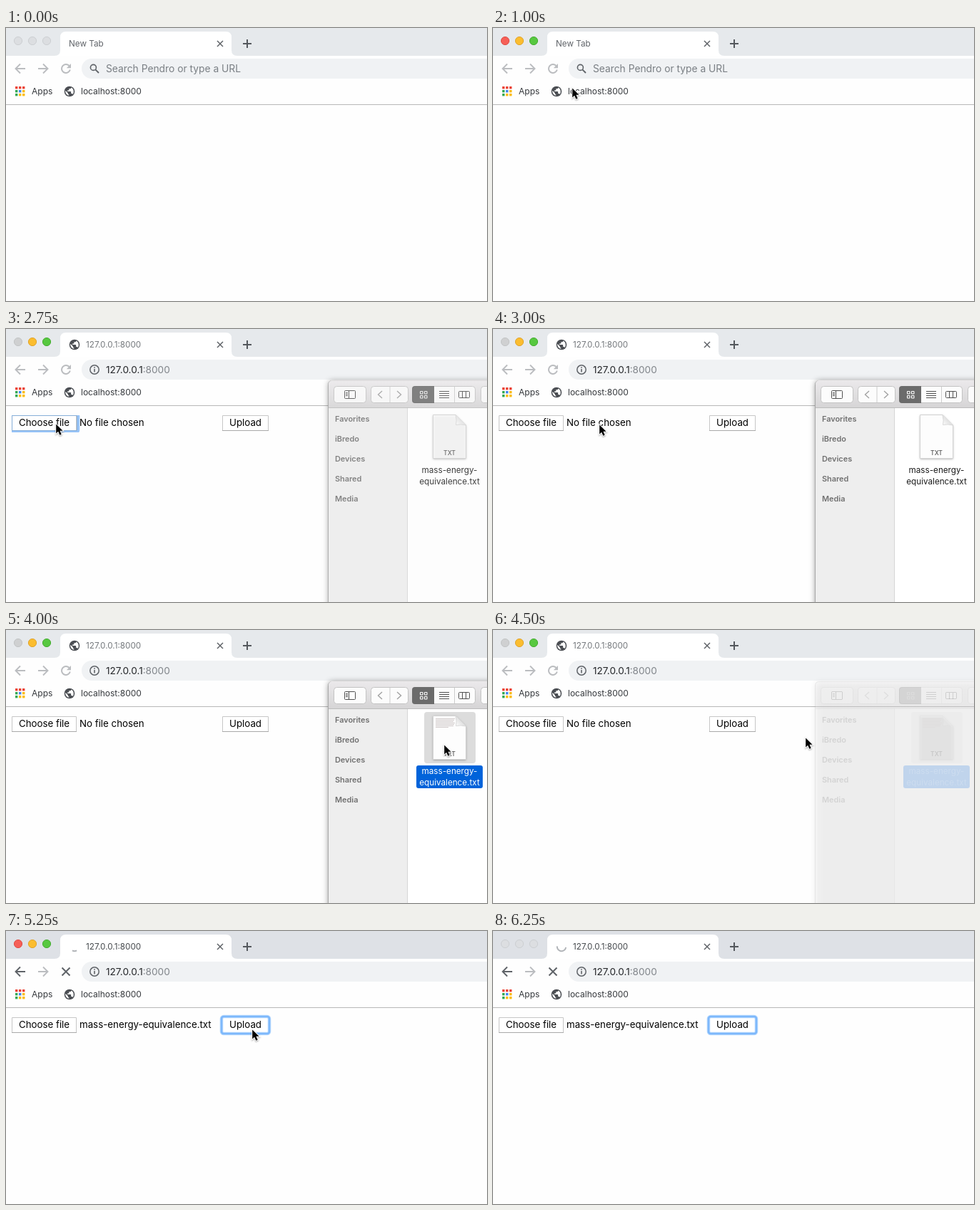
Animation, 674 px wide and 383 px high, one loop 6500 ms. Source, as an HTML page with a canvas:

```html
<!DOCTYPE html>
<html lang="en">
<head>
<meta charset="utf-8">
<title>File upload</title>
<style>
html, body { margin: 0; width: 100%; height: 100%; overflow: hidden; background: #fff; }
canvas { display: block; width: 674px; height: 383px; }
</style>
</head>
<body>
<canvas id="stage" width="674" height="383"></canvas>
<script>
const ctx = document.getElementById('stage').getContext('2d');
const W = 674, H = 383, LOOP = 6500, STEP = 250;
const DARK = '#5f6368', DIM = '#bbbdc0';

// [first step, x, y]; without a place the pointer is hidden
const pointerKeys = [
  [0], [1, 519, 191], [2, 122, 136], [3, 96, 93], [4, 110, 83], [8, 69, 128],
  [9, 69, 132], [12, 148, 133], [13, 539, 165], [14, 568, 173], [15, 613, 160],
  [18, 437, 150], [19, 360, 134], [20, 344, 137], [22]
];
const spinnerArcs = [[60, 120], [80, 150], [80, 230], [130, 270], [8, 185]];

const between = (n, a, b) => n >= a && n < b;

function fill(path, color) {
  ctx.fillStyle = color;
  ctx.fill(new Path2D(path));
}

function line(path, color, width = 1) {
  ctx.strokeStyle = color;
  ctx.lineWidth = width;
  ctx.stroke(new Path2D(path));
}

function rect(x, y, w, h, color) {
  ctx.fillStyle = color;
  ctx.fillRect(x, y, w, h);
}

function box(x, y, w, h, r, color, border, width = 1) {
  ctx.beginPath();
  ctx.roundRect(x, y, w, h, r);
  if (color) { ctx.fillStyle = color; ctx.fill(); }
  if (border) { ctx.strokeStyle = border; ctx.lineWidth = width; ctx.stroke(); }
}

function arc(x, y, r, from, to, color, width) {
  ctx.beginPath();
  ctx.arc(x, y, r, from * Math.PI / 180, to * Math.PI / 180);
  ctx.strokeStyle = color;
  ctx.lineWidth = width;
  ctx.stroke();
}

function dot(x, y, r, color, border) {
  ctx.beginPath();
  ctx.arc(x, y, r, 0, Math.PI * 2);
  ctx.fillStyle = color;
  ctx.fill();
  if (border) { ctx.strokeStyle = border; ctx.lineWidth = 1; ctx.stroke(); }
}

function text(str, x, y, size, color, align = 'left', weight = 400) {
  ctx.font = `${weight} ${size}px Inter, Roboto, sans-serif`;
  ctx.textAlign = align;
  ctx.fillStyle = color;
  ctx.fillText(str, x, y);
}

function at(x, y, draw) {
  ctx.save();
  ctx.translate(x, y);
  draw();
  ctx.restore();
}

function globe(x, y) {
  at(x, y, () => {
    dot(0, 0, 7.3, '#4b4e53');
    fill('M-5.7-1.3L-2.2 2.2V3Q-2.2 4.4-.7 4.4V5.8A5.85 5.85 0 0 1-5.7-1.3Z', '#fff');
    fill('M2.2-5.4V-5Q2.2-3.7.7-3.7H-.7V-2.2Q-.7-1.5-1.5-1.5H-2.9V0H1.5Q2.2 0 2.2.7V2.9H2.9Q4 2.9 4.3 3.9A5.85 5.85 0 0 0 2.2-5.4Z', '#fff');
  });
}

function lights(n) {
  const on = between(n, 4, 25), modal = between(n, 10, 20);
  const colors = [['#f65f57', '#df4d45'], ['#fbbd2f', '#e0a32a'], ['#57c840', '#45ad31']];
  colors.forEach(([color, border], i) => {
    if (!on) [color, border] = ['#dcdee1', '#cccfd2'];
    else if (modal && i === 0) [color, border] = ['#cfd0d1', '#c2c4c5'];
    dot(17 + i * 20, 18, 5.6, color, border);
  });
}

function tabStrip(n, active, blank, loading) {
  rect(0, 0, W, 39, active ? '#dee1e6' : '#e6e9ec');
  lights(n);
  fill('M68 39Q76 39 76 31V13Q76 5 84 5H308Q316 5 316 13V31Q316 39 324 39Z', '#fff');
  const ink = active ? '#45494d' : between(n, 10, 20) ? '#74787c' : DARK;
  if (blank) {
    text('New Tab', 88, 26, 11.7, ink);
  } else {
    text('127.0.0.1:8000', 112, 26, 11.7, ink);
    if (loading) {
      const [from, to] = spinnerArcs[Math.max(0, n - 21)];
      arc(96, 22, 6.2, from, to, '#b1b4b8', 2);
    } else {
      globe(96, 22);
    }
  }
  line('M296 18L304 26M304 18L296 26', DARK, 1.5);
  line('M332 22H344M338 16V28', '#54585d', 2);
}

function toolbar(active, blank, loading) {
  line('M27 57H14M20 50.5L13.5 57L20 63.5', active ? DARK : DIM, 1.9);
  line('M45 57H58M52 50.5L58.5 57L52 63.5', DIM, 1.9);
  const ink = active ? DARK : DIM;
  if (loading) {
    line('M78.5 51.5L89.5 62.5M89.5 51.5L78.5 62.5', ink, 2);
  } else {
    arc(84, 57, 6, 15, 318, ink, 2);
    fill('M91 50V56.2H84.8Z', ink);
  }

  box(106, 43, W, 28, 14, '#f0f2f4');
  if (blank) {
    arc(122.4, 55.4, 4, 0, 360, DARK, 1.6);
    line('M125.3 58.3L130 63', DARK, 1.9);
    text('Search Pendro or type a URL', 140, 62, 13.8, '#7a7f84');
  } else {
    arc(124, 57, 6.2, 0, 360, DARK, 1.5);
    rect(123.2, 56, 1.6, 4.4, DARK);
    rect(123.2, 53.2, 1.6, 1.6, DARK);
    text('127.0.0.1', 140, 62, 13.6, '#25272a');
    const host = ctx.measureText('127.0.0.1').width;
    text(':8000', 140 + host, 62, 13.6, '#80858a');
  }
}

function bookmarks(n) {
  if (between(n, 6, 9)) box(75, 75, 118, 27, 13.5, n < 8 ? '#f1f3f4' : '#f8f9fa');
  const R = '#ea4335', G = '#34a853', B = '#4285f4', Y = '#fbbc05';
  [R, R, R, G, B, Y, G, Y, Y].forEach((color, i) =>
    rect(13 + i % 3 * 5, 82 + Math.floor(i / 3) * 5, 3.4, 3.4, color));
  text('Apps', 36, 93, 12, '#35383c');
  globe(89, 89);
  text('localhost:8000', 105, 93, 12, '#35383c');
  rect(0, 107, W, 1, '#b7b7b7');
}

function button(x, w, label) {
  box(x + .5, 121.5, w - 1, 21, 0, '#fff', '#c6c6c6');
  rect(x, 142, w, 1, '#a9a9a9');
  text(label, x + w / 2, 136, 13.3, '#000', 'center');
}

function page(n) {
  const picked = n >= 20;
  button(8, 91, 'Choose file');
  if (between(n, 9, 12) || between(n, 19, 21)) {
    ctx.save();
    ctx.beginPath();
    ctx.rect(8, 121, 300, 24);
    ctx.clip();
    box(7, 120, 94.5, 24, 2, null, '#98c4f8', 3.4);
    box(8.5, 121.5, 91, 21, 0, null, '#86aed8');
    ctx.restore();
  }
  text(picked ? 'mass-energy-equivalence.txt' : 'No file chosen', 103, 136, 13.3, '#000');
  button(303, 65, 'Upload');
  if (n >= 21) {
    box(302, 120, 67, 24, 3, null, '#b9d9fd', 4.6);
    box(302, 120, 67, 24, 3, null, '#7db8fb', 2.6);
  }
}

function fileIcon(selected) {
  if (selected) box(586, 115, 72, 72, 4, '#dcdcdc');
  ctx.save();
  ctx.shadowColor = 'rgba(0,0,0,.35)';
  ctx.shadowBlur = 3;
  ctx.shadowOffsetY = 1;
  const sheet = 'M598.5 120.5H630L644.5 135V181.5H598.5Z';
  fill(sheet, '#fdfdfd');
  ctx.restore();
  line(sheet, '#d2d2d2');
  const fold = ctx.createLinearGradient(630, 135, 640, 126);
  fold.addColorStop(0, '#fff');
  fold.addColorStop(1, '#d8d8d8');
  fill('M630 120.5Q632 129 630.5 134.5Q637 133 644.5 135Z', fold);
  line('M630 120.5Q632 129 630.5 134.5Q637 133 644.5 135', '#cfcfcf', .8);
  if (selected) {
    for (let i = 0; i < 7; i++) rect(602, 124 + i * 2, i === 6 ? 18 : 27 - i % 3, 1, '#cfc8c8');
  }
  text('TXT', 621.5, 177, 8.6, '#555', 'center', 500);

  if (selected) box(575, 190, 93, 32, 3, '#0063da');
  const ink = selected ? '#fff' : '#1c1c1c';
  text('mass-energy-', 621.5, 202, 11.7, ink, 'center');
  text('equivalence.txt', 621.5, 218, 11.7, ink, 'center');
}

function pickerBar() {
  const shade = ctx.createLinearGradient(0, 72, 0, 110);
  shade.addColorStop(0, '#ebe9eb');
  shade.addColorStop(1, '#d6d5d6');
  rect(452, 72, W, 38, shade);
  rect(452, 110, W, 1, '#bcbcbc');

  [[459, 46], [511, 53], [569, 89], [665, 40]].forEach(([x, w]) =>
    box(x + .5, 80.5, w - 1, 23, 4, '#fcfcfc', '#c3c3c3'));
  box(569, 80, 31, 24, [4, 0, 0, 4], '#6b6b6b');
  line('M538 81V103M628.5 81V103', '#cccccc');

  box(474.5, 86.5, 15, 11, 1, null, '#505050');
  line('M480.5 87V97M476 89.5H479M476 91.5H479M476 93.5H479', '#505050');
  line('M527 87L521.5 92L527 97M548 87L553.5 92L548 97', '#a2a2a2', 1.4);
  for (let i = 0; i < 4; i++) {
    box(580.5 + i % 2 * 6, 87.5 + (i >> 1) * 6, 3.5, 3.5, .5, null, '#fff', 1.1);
    rect(607, 87 + i * 3, 14, 1, '#505050');
  }
  box(634.5, 87.5, 15, 9, 1, null, '#505050');
  line('M639.5 88V97M644.5 88V97', '#505050');
}

function picker(alpha, selected) {
  ctx.save();
  ctx.globalAlpha = alpha;
  ctx.save();
  ctx.shadowColor = 'rgba(0,0,0,.45)';
  ctx.shadowBlur = 9;
  box(452, 73, 300, 360, 5, '#fff');
  ctx.restore();
  box(451.5, 72.5, 300, 400, 5, null, '#a9a9a9');

  ctx.beginPath();
  ctx.roundRect(452, 72, 300, 400, 5);
  ctx.clip();
  rect(452, 110, 110, H, '#eeeeee');
  rect(562, 110, 1, H, '#d6d6d6');
  rect(563, 110, W, H, '#fff');
  pickerBar();
  ['Favorites', 'iBredo', 'Devices', 'Shared', 'Media'].forEach((label, i) =>
    text(label, 461, 130 + i * 28, 10.9, '#707070', 'left', 600));
  fileIcon(selected);
  ctx.restore();
}

function pointer(n) {
  const [, x, y] = pointerKeys.findLast(key => key[0] <= n);
  if (x === undefined) return;
  at(x, y, () => {
    const arrow = 'M1.2 1.6V14.4L4.1 11.7L6.4 16.8L8.7 15.8L6.5 10.8H10.6Z';
    ctx.save();
    ctx.shadowColor = 'rgba(0,0,0,.35)';
    ctx.shadowBlur = 2;
    ctx.shadowOffsetY = 1;
    line(arrow, '#fff', 2);
    ctx.restore();
    fill(arrow, '#000');
  });
}

function draw(ms) {
  const n = Math.floor(ms % LOOP / STEP);
  const active = between(n, 5, 10) || n >= 20;
  const blank = n < 5;
  const loading = n === 5 || n >= 21;
  rect(0, 0, W, H, '#fefefe');
  tabStrip(n, active, blank, loading);
  toolbar(active, blank, loading);
  bookmarks(n);
  if (n >= 6) page(n);
  if (between(n, 11, 19)) picker(n === 11 ? .85 : n === 18 ? .2 : 1, n >= 16);
  pointer(n);
}

const start = performance.now();
function tick() {
  draw(performance.now() - start);
  requestAnimationFrame(tick);
}
tick();
</script>
</body>
</html>
```
